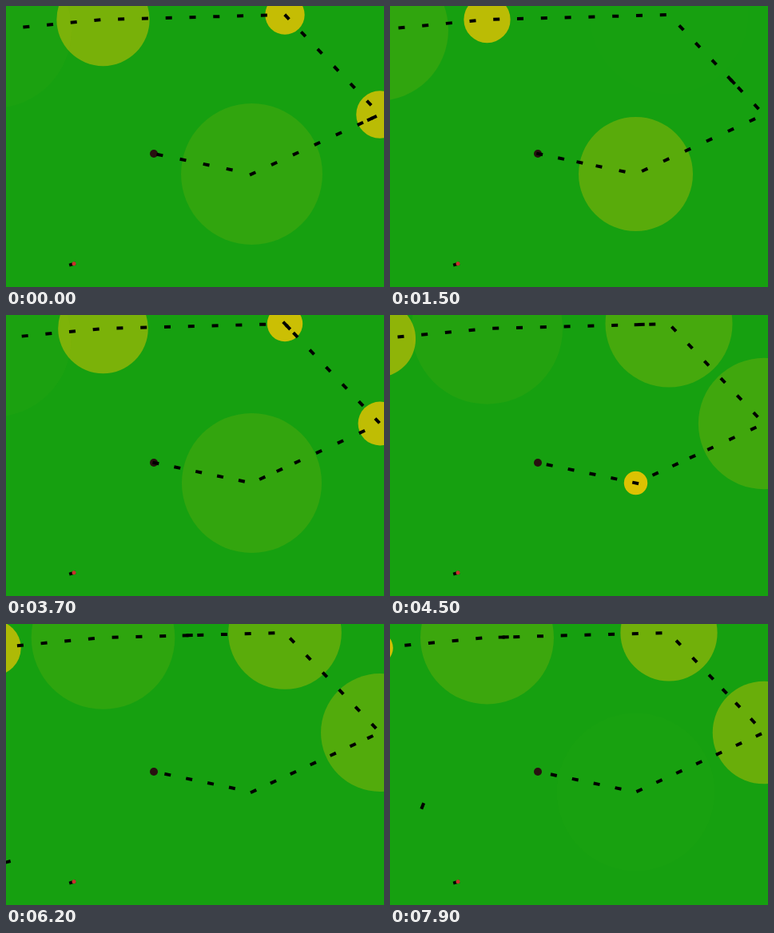
Animation, 473 px wide and 352 px high, one loop 8 s. Source, as an HTML page with a canvas:

```html
<!DOCTYPE html>
<html>
<head>
<meta charset="utf-8">
<style>
html, body { margin: 0; width: 100%; height: 100%; overflow: hidden; background: #16a010; }
canvas { display: block; width: 473px; height: 352px; }
</style>
</head>
<body>
<canvas id="stage" width="473" height="352"></canvas>
<script>
const ctx = document.getElementById('stage').getContext('2d');
const LOOP = 8000, STEP = 100;
const PULSE = 1.863; // seconds per ring

// Trail from the nest outwards; phase is the ring's progress at time 0.
const trail = [
  { x: 185, y: 185 },
  { x: 307.5, y: 210.5, phase: 0.661 },
  { x: 468, y: 136, phase: 0.162 },
  { x: 349, y: 11, phase: 0.132 },
  { x: 121.5, y: 17, phase: 0.353 },
  { x: -16, y: 30, phase: 0.864 }
];

// Runs of evenly spaced ants: [first offset, spacing, count]
const runs = [
  [322, 29.8, 18],
  [288.5, 5, 2],
  [7.6, 29.7, 10],
  [-17, -24.5, 1],
  [-40.8, -27.45, 14]
];
const ants = runs.flatMap(([start, gap, n]) =>
  Array.from({ length: n }, (_, i) => start + gap * i));

// Lone ants: a path walked at constant speed from a start time
const strays = [
  { start: 5.35, path: [{ x: -5, y: 342 }, { x: 12, y: 359 }] },
  { start: 5.8, path: [{ x: -17.5, y: 303.2 }, { x: 15, y: 294.5 }, { x: 45, y: 217 }] }
];

function pointAt(path, d) {
  if (d < 0) return null;
  for (let i = 1; i < path.length; i++) {
    const a = path[i - 1], b = path[i];
    const dx = b.x - a.x, dy = b.y - a.y, len = Math.hypot(dx, dy);
    if (d <= len) {
      return { x: a.x + dx * d / len, y: a.y + dy * d / len, angle: Math.atan2(dy, dx) };
    }
    d -= len;
  }
  return null;
}

function disc(x, y, r, color) {
  ctx.fillStyle = color;
  ctx.beginPath();
  ctx.arc(x, y, r, 0, Math.PI * 2);
  ctx.fill();
}

function drawAnt(p) {
  if (!p) return;
  ctx.save();
  ctx.translate(p.x, p.y);
  ctx.rotate(p.angle);
  ctx.fillStyle = '#000';
  ctx.fillRect(-4, -2, 8, 4);
  ctx.restore();
}

// The column starts slightly slower, then keeps 50 px/s.
const travel = t => t < 1.5 ? 47 * t : 70.5 + 50 * (t - 1.5);

function draw(t) {
  ctx.fillStyle = '#16a010';
  ctx.fillRect(0, 0, 473, 352);

  for (const { x, y, phase } of trail.slice(1)) {
    const left = 1 - (phase + t / PULSE) % 1;
    const fade = left * left;
    disc(x, y, 100 * (1 - fade), `rgba(255,200,0,${fade})`);
  }

  disc(185, 185, 5, '#281010');
  const moved = travel(t);
  for (const offset of ants) drawAnt(pointAt(trail, offset + moved));
  for (const { start, path } of strays) drawAnt(pointAt(path, (t - start) * 50));

  drawAnt({ x: 83, y: 323.5, angle: -0.27 });
  disc(85, 322.8, 2.5, '#c8322d');
}

const began = performance.now();
function tick() {
  const ms = Math.max(0, performance.now() - began) % LOOP;
  draw(Math.floor(ms / STEP) * STEP / 1000);
  requestAnimationFrame(tick);
}
tick();
</script>
</body>
</html>
```
